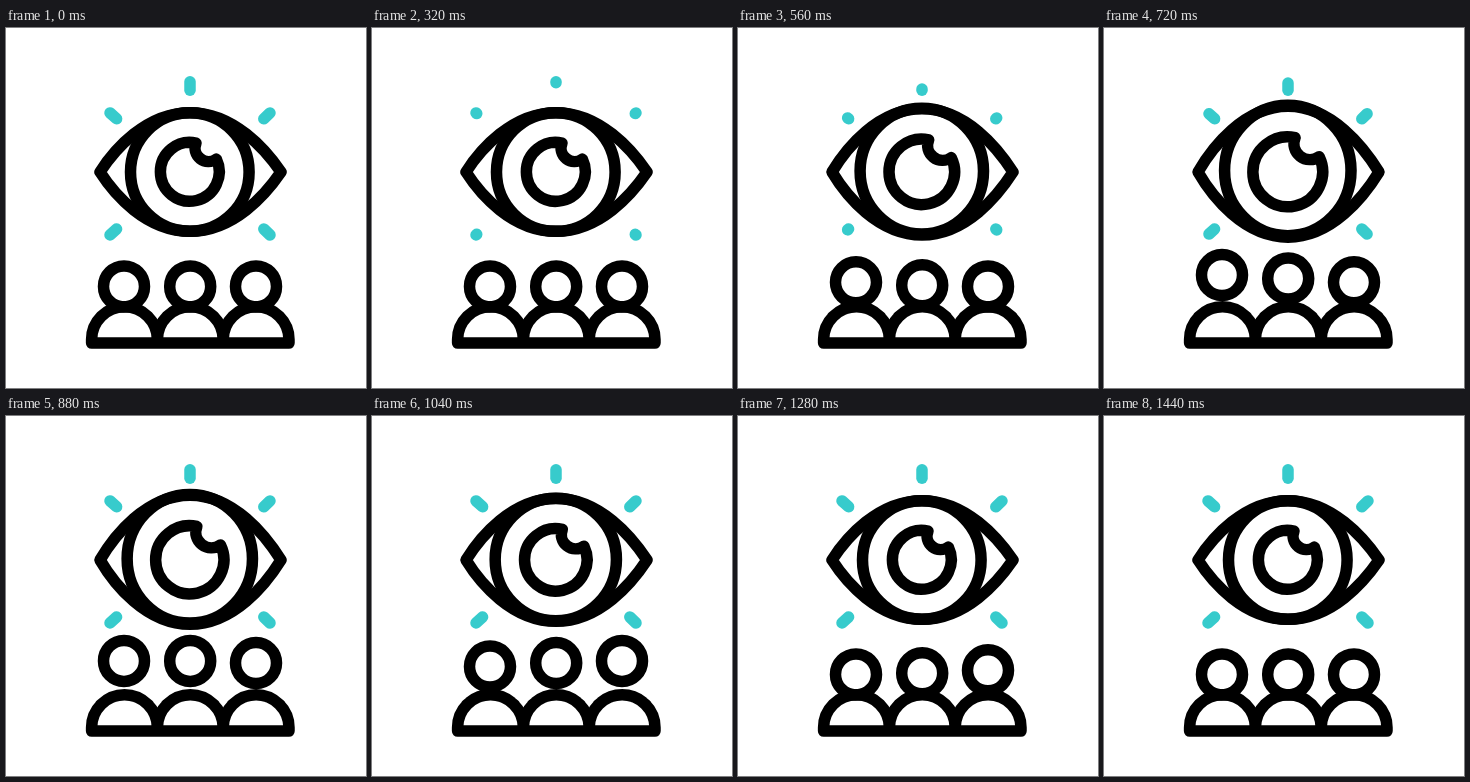
An HTML page that plays this animation: 360 px wide and 360 px high, repeating every 1.48 s.

```html
<!DOCTYPE html>
<html lang="en">
<head>
<meta charset="utf-8">
<title>Audience view</title>
<style>
html, body { margin: 0; width: 100%; height: 100%; overflow: hidden; background: #fff; }
svg { display: block; width: 100%; height: 100%; }
</style>
</head>
<body>
<svg viewBox="0 0 360 360" fill="none" stroke="#000" stroke-width="11.5" stroke-linecap="round" stroke-linejoin="round">
  <g id="rays" stroke="#37cbcc"></g>
  <path id="lid"/>
  <ellipse id="iris" cx="183.8"/>
  <path id="pupil" vector-effect="non-scaling-stroke"
    d="M190 115.1A29.4 29.4 0 1 0 210.3 131.1A13.5 13.5 0 0 1 190 115.1Z"/>
  <g id="heads"></g>
  <path d="M85.6 315.1V311.6a32.9 32.9 0 0 1 65.8 0a32.9 32.9 0 0 1 65.8 0a32.9 32.9 0 0 1 65.8 0V315.1ZM151.4 311.6V315.1M217.2 311.6V315.1"/>
</svg>
<script>
const LOOP = 1480, STEP = 40;
const NS = "http://www.w3.org/2000/svg";
const get = id => document.getElementById(id);
const lid = get("lid"), iris = get("iris"), pupil = get("pupil");

function add(parent, tag, attrs) {
  const el = document.createElementNS(NS, tag);
  set(el, attrs);
  return get(parent).appendChild(el);
}
function set(el, attrs) {
  for (const key in attrs) el.setAttribute(key, attrs[key]);
}

// Each ray runs from its inner to its outer end: x1, y1, x2, y2.
const rays = [
  [184, 62.2, 184, 53.7],
  [110.6, 90.8, 104, 84.9], [257.8, 90.8, 264, 84.9],
  [110.6, 201, 104, 207], [257.8, 201, 264, 207]
].map(ends => ({ ends, el: add("rays", "line", {}) }));

const heads = [118, 184.2, 250].map(cx => add("heads", "circle", { cx, r: 20.5 }));

// Eased ramp from 0 to 1 and a smooth rise and fall around a centre.
function ramp(t, from, to) {
  const u = Math.min(1, Math.max(0, (t - from) / (to - from)));
  return (1 - Math.cos(Math.PI * u)) / 2;
}
function bell(t, centre, half) {
  return 1 - ramp(Math.abs(t - centre), 0, half);
}

function drawRays(t) {
  const erased = t < 440 ? ramp(t, 40, 400) : 0;
  const grown = t < 440 ? 1 : ramp(t, 480, 800);
  const visible = grown > erased;
  for (const { ends: [x1, y1, x2, y2], el } of rays) {
    const dx = x2 - x1, dy = y2 - y1;
    set(el, {
      x1: x1 + dx * erased, y1: y1 + dy * erased,
      x2: x1 + dx * grown, y2: y1 + dy * grown,
      visibility: visible ? "visible" : "hidden"
    });
  }
}

function drawEye(t) {
  const open = bell(t, 760, 460);
  const h = 59.3 + 6.6 * open;
  const mid = h * 0.37;
  const top = 144 - h, bottom = 144 + h - 0.6 * open;
  set(lid, {
    d: `M94 144C108 ${144 - mid} 140 ${top} 184 ${top}S260 ${144 - mid} 275 144` +
       `C260 ${144 + mid} 228 ${bottom} 184 ${bottom}S108 ${144 + mid} 94 144Z`
  });
  set(iris, { cy: 144 - 1.5 * open, rx: 59.3 + 4 * open, ry: 59.3 + 6 * open });
  const s = 1 + 0.19 * open;
  set(pupil, { transform: `translate(184.2 144) scale(${s}) translate(-184.2 -144)` });
}

function drawHeads(t) {
  heads.forEach((el, i) => set(el, { cy: 258.4 - 13.8 * bell(t, 840 + 80 * i, 440) }));
}

function draw(now) {
  const t = Math.floor((now % LOOP) / STEP) * STEP;
  drawRays(t);
  drawEye(t);
  drawHeads(t);
}

const start = performance.now();
function tick() {
  draw(performance.now() - start);
  requestAnimationFrame(tick);
}
tick();
</script>
</body>
</html>
```
